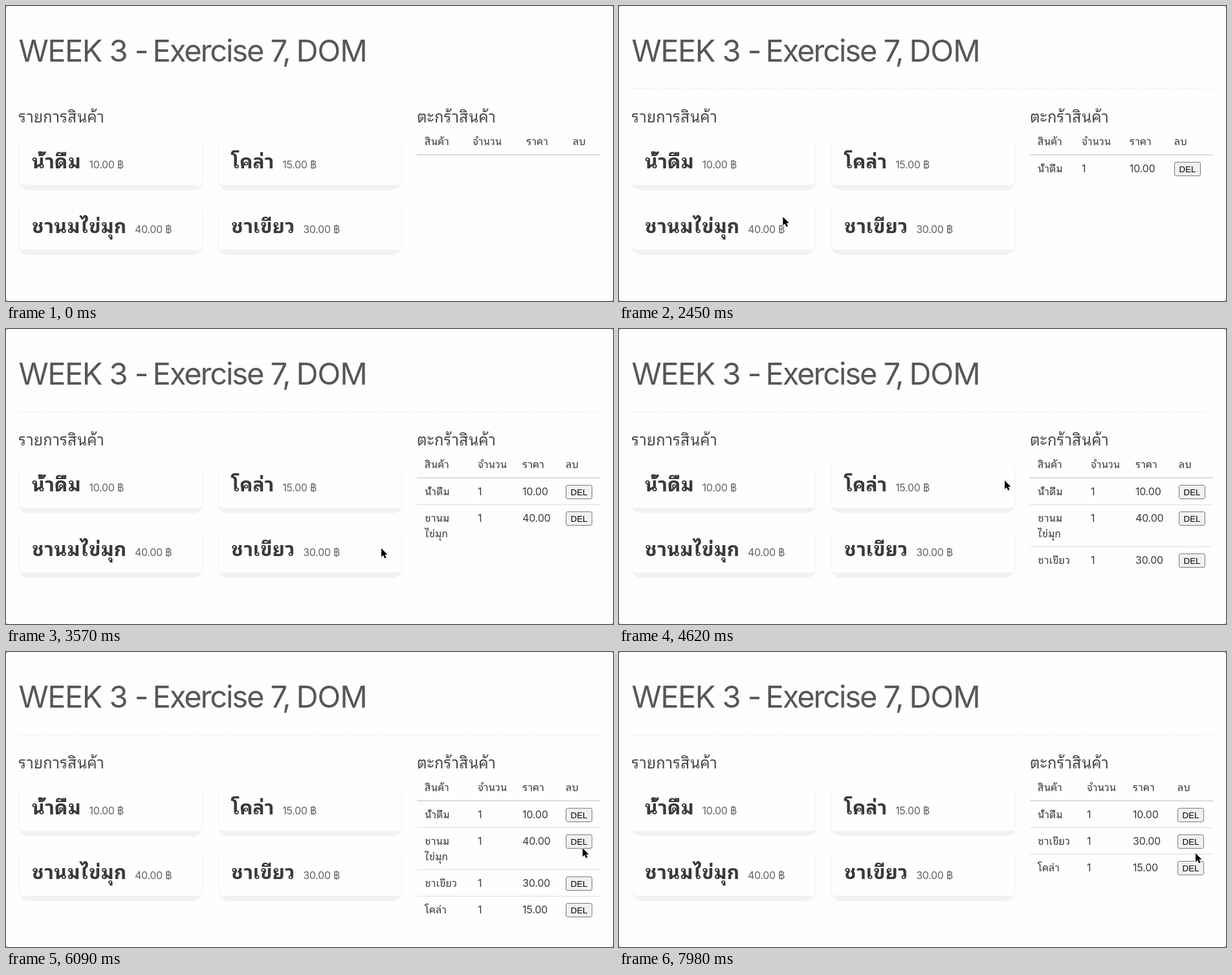
Animation, 938 px wide and 456 px high, one loop 8 s. Source, as an HTML page:

```html
<!DOCTYPE html>
<html lang="th">
<head>
<meta charset="utf-8">
<title>Cart exercise</title>
<style>
html, body { margin: 0; width: 100%; height: 100%; overflow: hidden; background: #fefefe; }
svg { display: block; width: 938px; height: 456px; }
text { font-family: Inter, "Noto Sans Thai Looped", "Noto Looped Thai", "Noto Sans Thai", "Noto Sans", sans-serif; font-size: 16px; fill: #3a3a3a; font-optical-sizing: none; }
.title { font-size: 47px; fill: #575757; }
.head { font-size: 24px; fill: #484848; }
.name { font-size: 30px; font-weight: 700; }
.price { font-size: 16px; font-weight: 400; fill: #636363; letter-spacing: -.3px; }
.num { letter-spacing: -.2px; }
.del { font-family: "Liberation Sans", Arial, sans-serif; font-size: 13.33px; fill: #000; text-anchor: middle; }
</style>
</head>
<body>
<svg viewBox="0 0 938 456">
  <rect width="938" height="456" fill="#fefefe"/>
  <path d="M0 0h2l-2 2zM938 0v2l-2-2zM0 456v-2l2 2zM938 456h-2l2-2z" fill="#8a8a8a"/>
  <g id="page"></g>
  <g id="rule" fill="none">
    <path d="M20 128.500H917" stroke="#f4f4f4"/>
    <path d="M20 128H917" stroke="#f0f0f0" stroke-dasharray="29 18"/>
  </g>
  <g id="table"></g>
  <path id="cursor" d="M0 0V13.400L3 10.600L5.200 15.600L7.600 14.600L5.400 9.700H9.500Z" stroke="#fff" stroke-width="1.800" paint-order="stroke" stroke-linejoin="round"/>
</svg>
<script>
const LOOP = 8000, STEP = 70;
const $ = id => document.getElementById(id);
const text = (x, y, s, cls = "") => `<text x="${x}" y="${y}" class="${cls}">${s}</text>`;
const line = (y, color, w = 1) => `<path d="M635 ${y}H918" stroke="${color}" stroke-width="${w}"/>`;

const water = { name: "น้ำดื่ม", price: "10.00" };
const cola = { name: "โคล่า", price: "15.00" };
const pearl = { name: "ชานมไข่มุก", price: "40.00", lines: ["ชานม", "ไข่มุก"] };
const green = { name: "ชาเขียว", price: "30.00" };

// Column edges follow the widest cell in the cart
const empty = [721, 804, 876], slim = [715, 789, 858], medium = [723, 794, 863], wide = [729, 798, 865];
const states = [
  { at: 0, cols: empty, items: [] },
  { at: 1750, cols: slim, items: [water] },
  { at: 2940, cols: wide, items: [water, pearl] },
  { at: 3920, cols: wide, items: [water, pearl, green] },
  { at: 4830, cols: wide, items: [water, pearl, green, cola] },
  { at: 6930, cols: wide, items: [water, pearl, green, cola], pressed: pearl },
  { at: 7070, cols: medium, items: [water, green, cola] }
];

// Pointer moves: start, end, x, y; it rests in between
const entry = [438, 447];
const moves = [
  [560, 910, 406, 428], [1050, 1750, 242, 249], [2100, 2550, 255, 337],
  [3010, 3570, 580, 339], [3710, 3990, 570, 341], [4130, 4620, 596, 234],
  [5320, 6090, 891, 303], [6160, 6510, 891, 296], [7840, 7980, 891, 311]
];

function card(item, i) {
  const x = 20 + 308 * (i % 2), y = 213 + 100 * (i >> 1);
  const r = x + 284, b = y + 64;
  return `<path d="M${x} ${b - 3}Q${x + 4} ${b + 8} ${x + 16} ${b + 8}H${r - 16}Q${r - 4} ${b + 8} ${r} ${b - 3}Z" fill="#f2f2f2"/>
    <path d="M${x} ${y}V${b - 6}Q${x} ${b} ${x + 6} ${b}H${r - 6}Q${r} ${b} ${r} ${b - 6}V${y}" fill="#fefefe" stroke="#f1f1f1"/>` +
    text(x + 19.5, y + 37.5, `${item.name}<tspan class="price" dx="13">${item.price} ฿</tspan>`, "name");
}

function drawPage() {
  const title = (x, s, gap) => `<text x="${x}" y="86" class="title" letter-spacing="${gap}">${s}</text>`;
  $("page").innerHTML =
    title(19.5, "WEEK 3 -", -1.5) + title(226.5, "Exercise 7,", -2.1) + title(448.5, "DOM", -1.1) +
    text(19, 179.5, "รายการสินค้า", "head") + text(635, 179.5, "ตะกร้าสินค้า", "head") +
    [water, cola, pearl, green].map(card).join("");
}

function button(x, y, pressed) {
  return `<rect x="${x + .5}" y="${y + .5}" width="40" height="21" rx="2.500" fill="${pressed ? "#dcdcdc" : "#f1f1f1"}" stroke="#7b7b7b"/>` +
    text(x + 20.5, y + 16, "DEL", "del");
}

function drawTable({ cols, items, pressed }) {
  const [qty, price, del] = cols;
  let y = 230;
  let out = text(647, 215, "สินค้า") + text(qty, 215, "จำนวน") + text(price, 215, "ราคา") +
    text(del, 215, "ลบ") + line(y, "#d2d2d2", 1.5);
  for (const item of items) {
    const lines = item.lines || [item.name];
    if (y > 230) out += line(y + .5, "#dedede");
    lines.forEach((s, k) => out += text(647, y + 27 + k * 24, s));
    out += text(qty, y + 27, "1", "num") + text(price, y + 27, item.price, "num") +
      button(del, y + 11, pressed === item);
    y += 17 + 24 * lines.length;
  }
  $("table").innerHTML = out;
}

function pointer(t) {
  let [x, y] = entry;
  for (const [from, to, tx, ty] of moves) {
    const k = Math.min(1, Math.max(0, (t - from) / (to - from)));
    const ease = k * k * (3 - 2 * k);
    x += (tx - x) * ease;
    y += (ty - y) * ease;
  }
  return [x, y];
}

let shown;
function render(ms) {
  const t = Math.floor(ms % LOOP / STEP) * STEP;
  const state = states.filter(s => s.at <= t).pop();
  if (state !== shown) drawTable(shown = state);
  $("rule").style.display = t < STEP ? "none" : "";
  $("cursor").style.display = t < moves[0][0] ? "none" : "";
  $("cursor").setAttribute("transform", `translate(${pointer(t)})`);
}

drawPage();
render(0);
const start = performance.now();
(function tick() {
  render(performance.now() - start);
  requestAnimationFrame(tick);
})();
</script>
</body>
</html>
```
